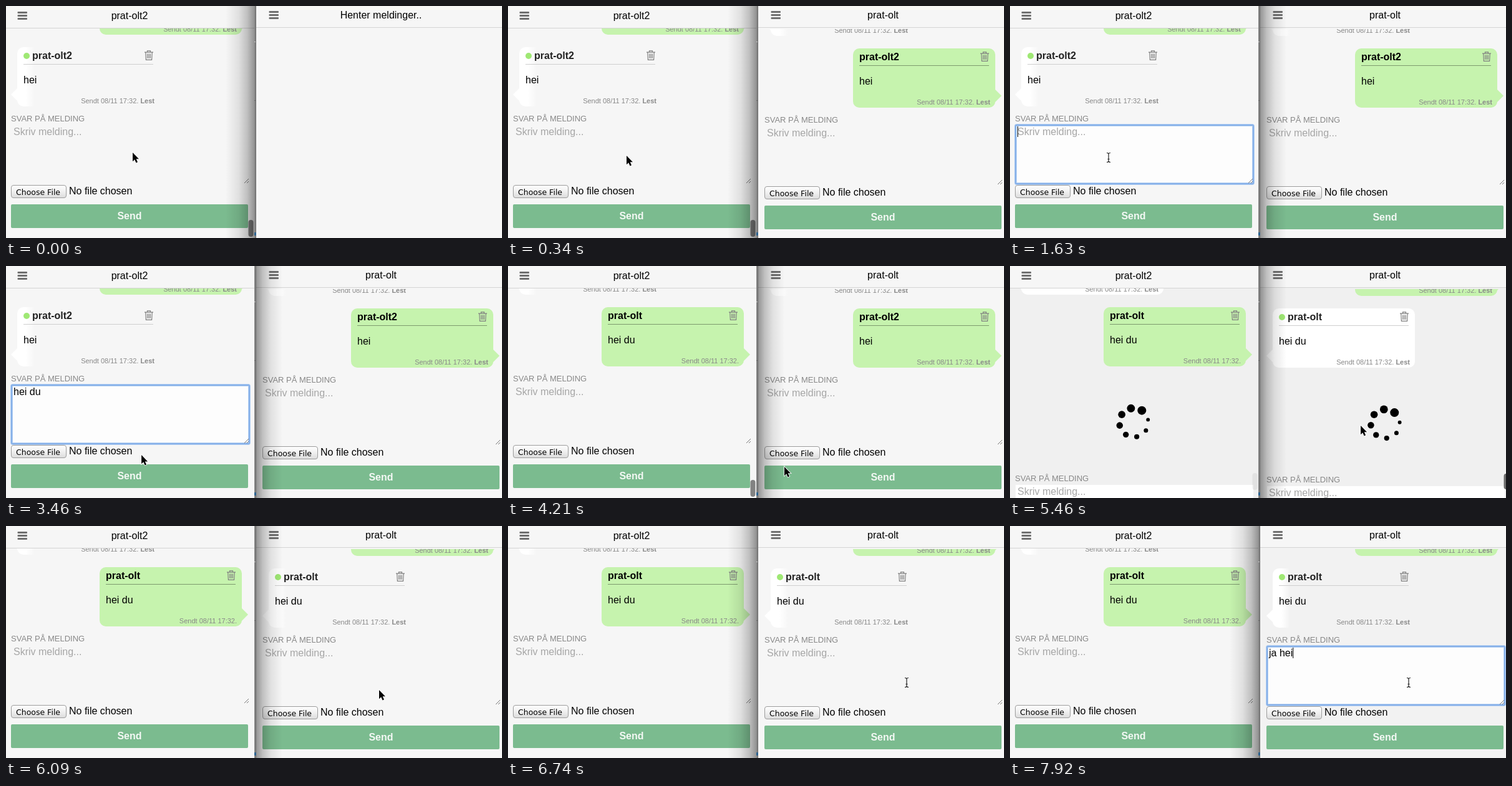
An HTML page for the animation above (8 s loop, 795 by 372 pixels).

```html
<!DOCTYPE html>
<html lang="no">
<head>
<meta charset="utf-8">
<title>Chat</title>
<style>
html, body { margin: 0; width: 100%; height: 100%; overflow: hidden; background: #f6f6f6; }
svg { display: block; }
text { font: 16px "Liberation Sans", Arial, sans-serif; white-space: pre; }
.bold { font-weight: bold; }
.meta { font-size: 11px; fill: #888; }
.label { font-size: 13px; fill: #888; }
.file { font: 12.5px "DejaVu Sans", sans-serif; }
</style>
</head>
<body>
<svg id="stage" width="795" height="372" viewBox="0 0 795 372">
  <defs>
    <clipPath id="leftClip"><rect width="398" height="372"/></clipPath>
    <clipPath id="rightClip"><rect x="401" width="394" height="372"/></clipPath>
    <clipPath id="bodyClip"><rect x="-5" y="35" width="410" height="340"/></clipPath>
    <linearGradient id="button" x2="0" y2="1">
      <stop stop-color="#fff"/><stop offset=".5" stop-color="#f0f0f0"/><stop offset="1" stop-color="#dcdcdc"/>
    </linearGradient>
    <linearGradient id="sheen" gradientUnits="userSpaceOnUse" x1="18" x2="46" y1="0" y2="0">
      <stop stop-color="#fff"/><stop offset=".5" stop-color="#fff"/><stop offset="1" stop-color="#fff" stop-opacity="0"/>
    </linearGradient>
    <linearGradient id="shade">
      <stop stop-opacity=".4"/><stop offset=".25" stop-opacity=".22"/>
      <stop offset=".55" stop-opacity=".09"/><stop offset="1" stop-opacity="0"/>
    </linearGradient>
  </defs>
  <g id="scene"></g>
</svg>
<script>
const LOOP = 8000;
const ME = 'prat-olt', YOU = 'prat-olt2';
const scene = document.getElementById('scene');
const pen = document.createElement('canvas').getContext('2d');
pen.font = '16px "Liberation Sans", Arial, sans-serif';

const within = (t, a, b) => t >= a && t < b;
const clamp = v => Math.max(0, Math.min(1, v));
const text = (x, y, s, attrs = '') => `<text x="${x}" y="${y}" ${attrs}>${s}</text>`;
const rect = (x, y, w, h, fill, attrs = '') =>
  `<rect x="${x}" y="${y}" width="${w}" height="${h}" fill="${fill}" ${attrs}/>`;

// Text typed so far, or null before the first key
function typed(t, word, times) {
  const n = times.filter(k => t >= k).length;
  return n ? word.slice(0, n) : null;
}

// Pointer track: time, x, y
const track = [
  [0, 203, 235], [60, 203, 235], [340, 190, 240], [1400, 190, 240], [1600, 158, 243],
  [3290, 158, 243], [3460, 217, 303], [3690, 234, 330], [3870, 234, 330], [4210, 443, 322],
  [4390, 443, 322], [4700, 443, 306], [4820, 443, 306], [5240, 515, 282], [5460, 562, 256],
  [5950, 589, 263], [6040, 590, 263], [6090, 598, 263], [6600, 598, 263], [6740, 639, 251], [LOOP, 639, 251]
];
function pointerAt(t) {
  let i = 1;
  while (i < track.length - 1 && t > track[i][0]) i++;
  const [t0, x0, y0] = track[i - 1], [t1, x1, y1] = track[i];
  const p = clamp((t - t0) / (t1 - t0));
  return [x0 + (x1 - x0) * p, y0 + (y1 - y0) * p];
}

function pointer(t) {
  const [x, y] = pointerAt(t);
  const beam = within(t, 1500, 3340) || t >= 6680;
  const shape = beam
    ? `<path d="M-3-7.5Q0-7.5 0-5.5Q0-7.5 3-7.5M0-6V6M-3 7.5Q0 7.5 0 5.5Q0 7.5 3 7.5M-1.5 2.5H1.5" fill="none" stroke="#222" stroke-width="1.2"/>`
    : `<path d="M0 0V14.2L3.2 11.2L5.6 16.4L8 15.3L5.7 10.3H10Z" stroke="#fff" stroke-width="1.6" paint-order="stroke"/>`;
  return `<g transform="translate(${x.toFixed(1)} ${y.toFixed(1)})">${shape}</g>`;
}

const trash = x => `<path transform="translate(${x} 71)" fill="none" stroke="#808080" stroke-width="1.2"
  d="M0 3.2H14M4.5 3V.8H9.5V3M1.8 3.5L2.4 15.3H11.6L12.2 3.5M4.7 5.5V13M7 5.5V13M9.3 5.5V13"/>`;

function message({ sent, body, read }, dy, white) {
  const x = sent ? 160 : 28;
  const fill = sent ? '#c6f3ae' : white ? '#fff' : 'url(#sheen)';
  const tail = sent ? 'M377 131L388 142L377 153Z' : 'M19 131L8 142L19 153Z';
  return `<g transform="translate(0 ${dy})">
    ${rect(x - 10, 66, 228, 95, fill, 'rx="10"')}<path d="${tail}" fill="${fill}"/>
    ${sent ? '' : '<circle cx="33" cy="80" r="5" fill="#9fe874"/>'}
    ${text(sent ? x : 42, 85, sent === YOU || !sent && sent !== ME ? body.from : body.from, `class="bold" fill="${sent ? '#000' : '#222'}"`)}
    ${trash(x + 194)}
    ${rect(x, 93, 208, 1, sent ? '#7d9a6e' : '#cfcfcf')}
    ${text(x, 124, body.text)}
    ${text(x + 210, 156, 'Sendt 08/11 17:32.' + (read ? ' <tspan class="bold">Lest</tspan>' : ''), 'class="meta" text-anchor="end"')}
  </g>`;
}

function form({ value, focus, caret, loading }) {
  const box = focus
    ? rect(9, 191, 381, 94, '#fdfdfd', 'rx="2" stroke="#b5d0f3" stroke-width="4"') +
      rect(9, 191, 381, 94, 'none', 'rx="1" stroke="#86b0e8" stroke-width="2"')
    : loading ? rect(9, 191, 381, 94, '#fff') : '';
  const caretX = 12 + pen.measureText(value || '').width;
  return `<g transform="translate(0 ${loading ? 160 : 0})">
    ${text(8, 185, 'SVAR PÅ MELDING', 'class="label"')}${box}
    ${value === null ? text(12, 207, 'Skriv melding...', 'fill="#a6a6a6"') : text(12, 207, value)}
    ${caret ? rect(caretX, 193, 1, 17, '#000') : ''}
    <path d="M382 284L389 277M386 284L389 281" stroke="#777"/>
    ${rect(8.5, 287.5, 88, 20, 'url(#button)', 'rx="3.5" stroke="#9c9c9c"')}
    ${text(16, 303, 'Choose File', 'class="file"')}
    ${text(101, 302, 'No file chosen')}
    ${rect(8, 318, 380, 38, '#7bbb8f', 'rx="2"')}
    ${text(198, 342, 'Send', 'class="bold" fill="#f3f8f4" text-anchor="middle"')}
  </g>`;
}

// Eight dots shrinking behind the leading one
function spinner(t, phase) {
  const turn = -37 + phase + (t - 4790) * .5164;
  let dots = '';
  for (let k = 0; k < 8; k++) {
    const a = (turn - 45 * k) * Math.PI / 180;
    dots += `<circle cx="${(198.5 + 23.2 * Math.cos(a)).toFixed(2)}" cy="${(251 + 23.2 * Math.sin(a)).toFixed(2)}" r="${7 - k * .58}"/>`;
  }
  return dots;
}

function pane(p, t) {
  const bg = p.loading ? '#f0f0f0' : p.bg;
  const content = p.blank ? '' :
    message(p.last, -115, p.loading) + message(p.now, 0, p.loading) +
    (p.loading ? spinner(t, p.phase) : '') + form(p);
  const bars = [0, 5, 10].map(y => rect(18.5, 9 + y, 15.5, 3, '#707070', 'rx="1"')).join('');
  return `<g clip-path="url(#${p.clip})">${rect(p.x - 5, 0, 405, 372, bg)}
    <g transform="translate(${p.x} ${p.dy})"><g clip-path="url(#bodyClip)">${content}</g></g>
    <g transform="translate(${p.x} ${p.head})">
      ${rect(-5, -2, 405, 37, '#f6f6f6')}${rect(-5, 35, 405, 1, '#d4d4d4')}${bars}
      ${text(198, 21, p.title, 'text-anchor="middle"')}
    </g></g>`;
}

const note = (from, sent, words, read) => ({ sent, read, body: { from, text: words } });

function draw(t) {
  const replied = t >= 4040, arrived = t >= 5240;
  const leftText = replied ? null : typed(t, 'hei du', [2110, 2460, 2640, 2740, 2830, 2930]);
  const rightText = typed(t, 'ja hei', [7390, 7500, 7610, 7710, 7820, 7920]);

  const left = {
    clip: 'leftClip', x: 0, dy: 0, head: 0, title: YOU, bg: '#f6f6f6', phase: -6,
    last: replied ? note(YOU, false, 'hei', true) : note(ME, true, 'hei', true),
    now: replied ? note(ME, true, 'hei du', false) : note(YOU, false, 'hei', true),
    loading: within(t, 3930, 4210) || within(t, 5000, 6000),
    value: leftText, focus: within(t, 1400, 3930), caret: within(t, 1400, 3340)
  };
  const right = {
    clip: 'rightClip', x: 403, dy: 2, head: -1, phase: 0,
    title: t < 110 ? 'Henter meldinger..' : ME,
    blank: t < 110, bg: t >= 6920 ? '#f2f2f2' : '#f6f6f6',
    last: arrived ? note(YOU, true, 'hei', true) : note(ME, false, 'hei', true),
    now: arrived ? note(ME, false, 'hei du', true) : note(YOU, true, 'hei', true),
    loading: within(t, 110, 300) || within(t, 4450, 5980),
    value: rightText, focus: t >= 6920, caret: t >= 6920
  };

  // The focused window casts its shadow on the other one
  const onRight = within(t, 820, 6330);
  const shadow = onRight ? rect(401, 0, 42, 372, 'url(#shade)')
    : `<g transform="translate(398 0) scale(-1 1)">${rect(0, 0, 46, 372, 'url(#shade)')}</g>`;

  const bar = t < 3000 ? 1 - clamp((t - 820) / 350)
    : replied ? 1 - clamp((t - 5210) / 285) : 0;
  const barY = arrived ? 332 : 343;

  scene.innerHTML = pane(left, t) + pane(right, t) +
    rect(388.5, barY, 8, 27, '#828282', `rx="4" opacity="${bar}"`) +
    (within(t, 5300, 5950) ? rect(791.5, 333, 8, 25, '#6c6c6c', 'rx="4"') : '') +
    rect(398, 0, 3, 372, '#858585') + rect(400, 0, 1, 372, '#696969') +
    rect(398, 57, 2, 1, '#ccc') + rect(398, 151, 2, 1, '#666') + rect(398, 363, 3, 5, '#2f6490') +
    shadow + pointer(t);
}

const start = performance.now();
function tick() {
  draw((performance.now() - start) % LOOP);
  requestAnimationFrame(tick);
}
tick();
</script>
</body>
</html>
```
